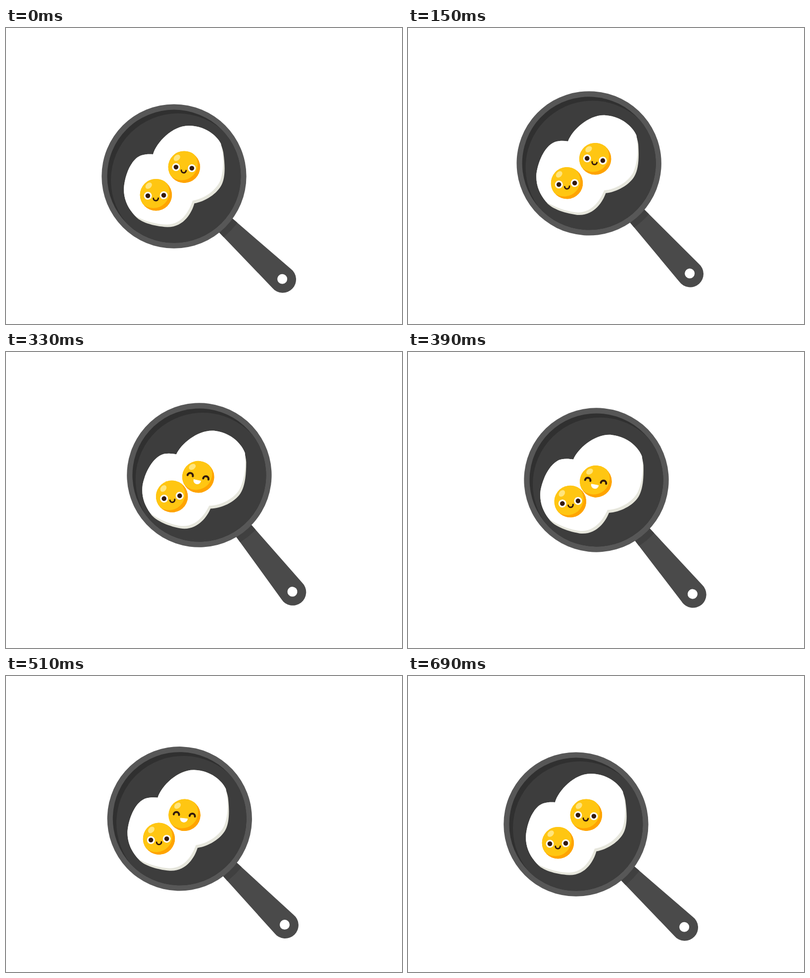
An HTML page that plays this animation: 800x600 px, repeating every 720 ms.

```html
<!DOCTYPE html>
<html lang="en">
<head>
<meta charset="utf-8">
<title>Fried eggs</title>
<style>
  html, body { margin: 0; width: 100%; height: 100%; overflow: hidden; background: #fff; }
  svg { display: block; width: 100%; height: 100%; }
  .ink { fill: none; stroke: #33190c; stroke-linecap: round; }
</style>
</head>
<body>
<svg viewBox="0 0 800 600">
  <defs>
    <clipPath id="base"><circle r="159"/></clipPath>
    <clipPath id="bowl"><circle r="135"/></clipPath>
    <clipPath id="ball"><circle r="32.4"/></clipPath>
    <path id="grip" d="M140 -19.3L145 -19.5L300 -26.8A27 27 0 1 1 300 26.8L145 19.5L140 19.3Z"/>
    <g id="yolk">
      <circle r="32.4" fill="#ffa400"/>
      <circle cx="-5.2" cy="-5.6" r="32.4" fill="#ffc612" clip-path="none"/>
    </g>
    <g id="yolkBody">
      <g clip-path="url(#ball)"><use href="#yolk"/></g>
      <ellipse rx="7.4" ry="5.4" fill="#ffe57d" transform="translate(-14.7 -18.6) rotate(-42)"/>
    </g>
    <g id="eye">
      <circle r="8" fill="#fff"/>
      <circle r="4.8" fill="#33190c"/>
    </g>
    <g id="smiling">
      <use href="#eye" x="-16.5" y="1.3"/>
      <use href="#eye" x="15.6" y="1.3"/>
      <path class="ink" stroke-width="3" d="M-5.4 6.8a4.9 4.9 0 0 0 9.8 0"/>
    </g>
    <g id="laughing">
      <path class="ink" stroke-width="4" d="M-21.9 .8a5.4 5.4 0 0 1 10.8 0M10.4 .8a5.4 5.4 0 0 1 10.8 0"/>
      <path fill="#fff" stroke="#fff" stroke-linejoin="round" d="M-7.9 6.9H6.7C6.5 11.5 3.5 14.4 -.6 14.4S-7.7 11.5 -7.9 6.9Z"/>
    </g>
  </defs>
  <g id="pan">
    <g transform="rotate(43.6)">
      <use href="#grip" fill="#4a4a4a"/>
      <g clip-path="url(#base)"><use href="#grip" fill="#404040"/></g>
      <circle cx="302" r="10" fill="#fff"/>
    </g>
    <circle r="146.2" fill="#575757"/>
    <circle r="135" fill="#303030"/>
    <g clip-path="url(#bowl)"><circle cx="7.9" cy="7.9" r="135.4" fill="#3d3d3d"/></g>
    <g id="white">
      <g transform="translate(-339.4 -300.6)">
        <path fill="#e6e6dc" d="M297 256C304 232 336 198 369 198C407 198 434 223 439 252C443 280 443 302 436 317C427 336 402 352 380.5 355.5C376 373 360 404 326 403.5C297 402 270 393 261 381C247 366 238 349 238 326C240 296 254 264 274 258C282 255.5 290 255.5 297 256Z"/>
        <path fill="#fff" d="M297 256C304 232 336 198 369 198C402 198 426 218 434 234C441 262 440 290 433 309C425 328 402 346 377 350C371 368 357 398 325 398.5C300 398 275 389 261 381C247 366 238 349 238 326C240 296 254 264 274 258C282 255.5 290 255.5 297 256Z"/>
      </g>
    </g>
    <g id="lower">
      <use href="#yolkBody"/>
      <use href="#smiling" transform="rotate(-1.8)"/>
    </g>
    <g id="upper">
      <use href="#yolkBody"/>
      <use id="face" href="#smiling" transform="rotate(4)"/>
    </g>
  </g>
</svg>
<script>
  const LOOP = 720, STEP = 30;
  const get = id => document.getElementById(id);
  const pan = get('pan'), white = get('white'), upper = get('upper'), lower = get('lower'), face = get('face');

  function ease(t, from, to) {
    const s = Math.min(1, Math.max(0, (t - from) / (to - from)));
    return s * s * (3 - 2 * s);
  }

  // Rises from 0 to 1 at peak and falls back to 0 at end.
  const swing = (t, start, peak, end) =>
    t < peak ? ease(t, start, peak) : 1 - ease(t, peak, end);

  function place(el, x, y, angle = 0) {
    el.setAttribute('transform', `translate(${x} ${y}) rotate(${angle})`);
  }

  function draw(t) {
    const push = swing(t, 0, 300, 600);
    const slide = 9.3 * swing(t, 35, 335, 620);
    const roll = 22.3 * swing(t, 3, 350, 665);
    const nudge = swing(t, 0, 335, 618);

    place(pan, 339.4 + 52.5 * push, 300.6 - 52.5 * push, 8.1 * push);
    place(white, -slide, slide);
    place(upper, 20.6 - roll, -18.8 + 1.03 * roll);
    place(lower, -36.4 - 12.3 * nudge, 37.7 + 12.8 * nudge, -8.1 * push - 8.5 * nudge);
    face.setAttribute('href', t >= 180 && t < 660 ? '#laughing' : '#smiling');
  }

  function tick() {
    const t = performance.now() % LOOP;
    draw(Math.floor(t / STEP) * STEP);
    requestAnimationFrame(tick);
  }
  tick();
</script>
</body>
</html>
```
